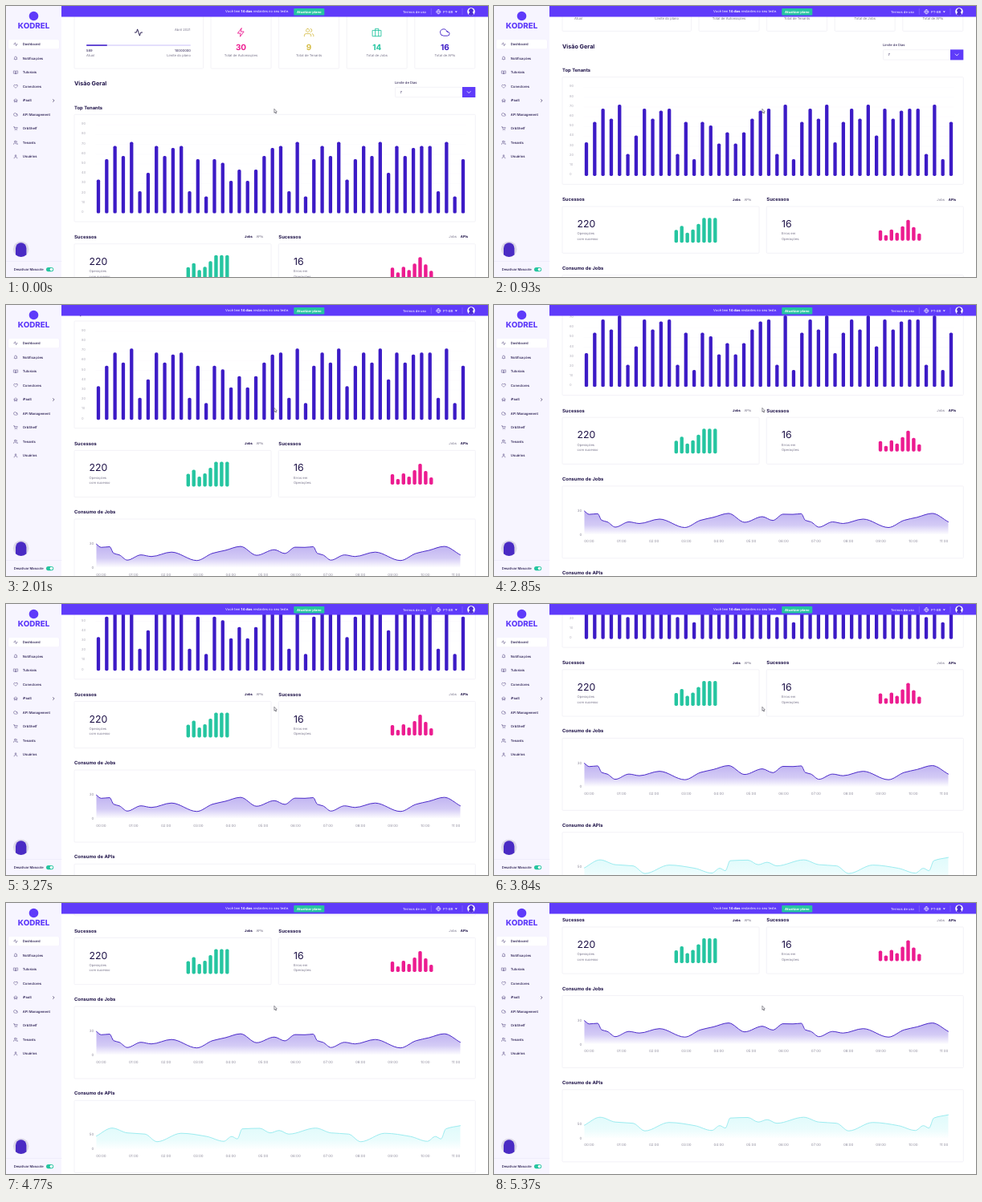
Write an HTML page that moves like this. It is 600 px wide and 338 px high and loops after 5400 ms.

```html
<!DOCTYPE html>
<html lang="pt-BR">
<head>
<meta charset="utf-8">
<title>Dashboard</title>
<style>
  html, body { margin: 0; width: 100%; height: 100%; overflow: hidden; background: #fff; }
  svg { display: block; width: 100vw; height: 100vh; }
  text { font-family: Inter, "Open Sans", sans-serif; text-rendering: geometricPrecision; white-space: pre; }
</style>
</head>
<body>
<svg id="stage" viewBox="0 0 600 338"></svg>
<script>
const LOOP = 5400, STEP = 30;
const NAVY = '#1d1147', GRAY = '#77738a', PALE = '#aeacb8', BLUE = '#3c1bc6',
      VIOLET = '#5f3bfa', TEAL = '#25c5a0', PINK = '#ec1c90';

const ICONS = {
  pulse: 'M22 12h-4l-3 9L9 3l-3 9H2',
  bell: 'M18 8A6 6 0 0 0 6 8c0 7-3 9-3 9h18s-3-2-3-9M13.7 21a2 2 0 0 1-3.4 0',
  book: 'M2 4h6a4 4 0 0 1 4 4v13a3 3 0 0 0-3-3H2zM22 4h-6a4 4 0 0 0-4 4v13a3 3 0 0 1 3-3h7z',
  heart: 'M20.8 4.6a5.5 5.5 0 0 0-7.8 0l-1 1.1-1-1.1a5.5 5.5 0 0 0-7.8 7.8l8.8 8.8 8.8-8.8a5.5 5.5 0 0 0 0-7.8z',
  home: 'M2 11l10-8 10 8M5 10v11h4v-7h6v7h4V10',
  cloud: 'M18 10h-1.3A8 8 0 1 0 9 20h9a5 5 0 0 0 0-10z',
  cart: 'M1 2h4l3 13h11l3-9H6M9 20v1M18 20v1',
  users: 'M17 21v-2a4 4 0 0 0-4-4H5a4 4 0 0 0-4 4v2M9 3a4 4 0 1 0 .1 0M23 21v-2a4 4 0 0 0-3-3.9M16 3.1a4 4 0 0 1 0 7.8',
  user: 'M20 21v-2a4 4 0 0 0-4-4H8a4 4 0 0 0-4 4v2M12 3a4 4 0 1 0 .1 0',
  zap: 'M13 2L4 14h7l-1 8 9-12h-7z',
  bag: 'M2 7h20v14H2zM8 7V3h8v4M8 7v14M16 7v14',
  globe: 'M12 2a10 10 0 1 0 .1 0M2 12h20M12 2c-6 6-6 14 0 20c6-6 6-14 0-20'
};

// Drawing helpers; text is centred vertically on y.
const text = (s, x, y, o = {}) => {
  const { size = 4.15, fill = GRAY, weight = 400, at = 'start' } = o;
  return `<text x="${x}" y="${y + size * 0.35}" font-size="${size}" font-weight="${weight}" fill="${fill}" text-anchor="${at}">${s}</text>`;
};
const rect = (x, y, w, h, fill, r = 0, extra = '') =>
  `<rect x="${x}" y="${y}" width="${w}" height="${h}" rx="${r}" fill="${fill}" ${extra}/>`;
const card = (x, y, w, h) => rect(x, y, w, h, '#fff', 1, 'stroke="#f0eff5" stroke-width=".8"');
const line = (d, stroke, w = 0.8) =>
  `<path d="${d}" fill="none" stroke="${stroke}" stroke-width="${w}" stroke-linecap="round" stroke-linejoin="round"/>`;
const icon = (name, x, y, size, stroke, w = 2) =>
  `<g transform="translate(${x - size / 2} ${y - size / 2}) scale(${size / 24})">${line(ICONS[name], stroke, w)}</g>`;
const heading = (s, y, x = 85, size = 5.86) => text(s, x, y, { size, fill: NAVY, weight: 700 });
const bars = (heights, x, gap, w, base, fill) =>
  heights.map((h, i) => rect(x + i * gap - w / 2, base - h, w, h, fill, w * 0.4)).join('');

// Monotone cubic through the points.
function curve(p) {
  const d = p.slice(1).map((q, i) => (q[1] - p[i][1]) / (q[0] - p[i][0]));
  const slope = i => {
    const a = d[Math.max(i - 1, 0)], b = d[Math.min(i, d.length - 1)];
    return a * b <= 0 ? 0 : 2 * a * b / (a + b);
  };
  return p.slice(1).reduce((path, [x, y], i) => {
    const [u, v] = p[i], h = (x - u) / 3;
    return path + `C${u + h} ${v + slope(i) * h} ${x - h} ${y - slope(i + 1) * h} ${x} ${y}`;
  }, 'M' + p[0]);
}

// A wave that repeats across the plot, with its own first and last value.
function wave(first, last, keys) {
  const left = 112.5, right = 565.5, period = 253.5;
  const again = keys.map(([x, y]) => [x + period, y]).filter(([x]) => x < right);
  return curve([[left, first], ...keys, ...again, [right, last]]);
}

function topCards() {
  let s = card(85, -20, 160.5, 98) + icon('pulse', 165, 33, 11, NAVY)
    + text('Abril 2021', 229.5, 30, { at: 'end' })
    + rect(100, 48.2, 130, 1.5, '#dcd5fb', 0.7) + rect(100, 48.2, 26, 1.5, BLUE, 0.7)
    + text('589', 100, 55.7, { fill: NAVY }) + text('10000000', 230, 55.7, { fill: NAVY, at: 'end' })
    + text('Atual', 100, 62) + text('Limite do plano', 230, 62, { at: 'end' });
  [['zap', 30, 'Automações', PINK], ['users', 9, 'Tenants', '#d6bd47'],
   ['bag', 14, 'Jobs', TEAL], ['cloud', 16, 'APIs', BLUE]].forEach(([ic, n, label, color], i) => {
    const x = 292.5 + i * 84.6;
    s += card(x - 37.5, -20, 75, 98) + icon(ic, x, 33, 12.5, color, 1.7)
      + text(n, x, 51.2, { size: 10, fill: color, weight: 700, at: 'middle' })
      + text('Total de ' + label, x, 62, { at: 'middle' });
  });
  return s;
}

// Tenant loads reuse pieces of one run.
function tenantLoads() {
  const run = [42, 67.5, 84, 71.5, 89, 27.5, 50.5, 84, 71.5, 81.5, 84];
  const dip = [27.5, 67.5, 21, 67.5, 63, 40.5, 54.5, 40.5, 54.5];
  const tail = [27.5, 89, 21, 67.5];
  return [...run, ...dip, ...run.slice(8), ...tail, ...run.slice(2, 5),
    ...run.slice(0, 5), ...run.slice(6), 84, ...tail];
}

function overview() {
  let s = heading('Visão Geral', 96.7, 85, 7.2)
    + text('Limite de Dias', 484, 95.5, { fill: NAVY })
    + card(484.5, 101.3, 99.5, 12.4) + rect(568, 101, 16.3, 13, VIOLET)
    + line('M574.2 106.6l2 2l2-2', '#fff') + text('7', 490.5, 107.5, { fill: NAVY })
    + heading('Top Tenants', 126.5) + card(85, 135.3, 499.3, 133.7);
  for (let i = 0; i < 10; i++) {
    const y = 256.5 - i * 12.2;
    s += line(`M112 ${y + 1.5}H572`, '#faf9fc', 0.5) + text(i * 10, 94, y, { fill: PALE });
  }
  return s + bars(tenantLoads(), 115, 10.318, 4.3, 258.6, BLUE);
}

function summary(x, n, lines, active) {
  const tab = (s, dx) => text(s, x + dx, 288, s === active ? { fill: NAVY, weight: 700 } : {});
  return heading('Sucessos', 288, x) + tab('Jobs', 212) + tab('APIs', 226.5)
    + card(x, 296.7, 245, 58.2)
    + text(n, x + 18.6, 318.5, { size: 12.3, fill: NAVY })
    + lines.map((l, i) => text(l, x + 18.6, 330.6 + i * 6.6)).join('');
}

function areaChart(title, top, ticks, d, color, fill) {
  const label = { size: 4.45, fill: '#8d8a9b' };
  let s = heading(title, top - 9) + card(85, top, 499.3, 90)
    + `<path d="${d}V${top + 60.5}H112.5Z" fill="url(#${fill})"/>` + line(d, color, 1)
    + ticks.map(([v, y]) => text(v, 109.3, y, { ...label, at: 'end' })).join('');
  for (let h = 0; h < 12; h++) {
    const x = Math.min(118.4 + h * 40.35, 560);
    s += text(String(h).padStart(2, '0') + ':00', x, top + 69, { ...label, at: 'middle' });
  }
  return s;
}

const jobs = wave(413.5, 427, [[118.5, 417.6], [129, 416.8], [134, 425], [141, 427], [151, 433.5],
  [168, 427], [181, 429], [206, 423.5], [237.5, 434], [257, 425], [273, 421.3], [292, 416.4],
  [312, 427.5], [334, 420.5], [347, 425.2], [360, 417.4]]);

const apis = wave(544, 531, [[132, 534], [151, 540], [173, 541.5], [188, 551], [218, 540.5],
  [250, 544.5], [271, 550.5], [281, 544.5], [288, 547.5], [294, 535], [316, 534.3], [329, 540],
  [340, 537], [352, 541.5]]);

function page() {
  return topCards() + overview()
    + summary(85, 220, ['Operações', 'com sucesso'], 'Jobs')
    + bars([16, 21, 12.5, 16.5, 23.5, 31, 31, 31], 226.8, 6.93, 4.4, 341.8, TEAL)
    + summary(339.3, 16, ['Erros em', 'Operações.'], 'APIs')
    + bars([13, 7, 14, 10, 18, 26, 17, 9], 481, 6.9, 4.4, 339.3, PINK)
    + areaChart('Consumo de Jobs', 382.3, [[30, 413], [0, 442.8]], jobs, '#4c2bca', 'jobs')
    + areaChart('Consumo de APIs', 499.6, [[50, 542], [0, 560]], apis, '#9cecf0', 'apis');
}

function topBar() {
  const white = { fill: '#fff' };
  return rect(69, 0, 531, 13.5, VIOLET)
    + text('Você tem <tspan font-weight="700">14 dias</tspan> restantes no seu teste.', 273, 7, white)
    + rect(358.3, 3, 38, 8.6, TEAL, 0.8)
    + text('Atualizar plano', 377.3, 7.2, { fill: '#fff', weight: 700, at: 'middle' })
    + text('Termos de uso', 494, 7.2, white)
    + line('M529.3 3.5V10.5M568 3.5V10.5', '#8c72fc', 0.6)
    + icon('globe', 538.3, 7.2, 6.2, '#fff') + text('PT-BR', 544, 7.2, white)
    + '<path d="M558.8 6.4h3l-1.5 1.8z" fill="#fff"/>'
    + '<circle cx="579" cy="7" r="4.8" fill="#fff"/>'
    + '<path d="M575.9 10.6c.2-1.7 1-2.3 1.5-2.6a2.7 2.7 0 1 1 3.2 0c.5.3 1.3.9 1.5 2.6a4.8 4.8 0 0 1-6.2 0z" fill="#4a2bd0"/>';
}

function sidebar() {
  const items = [['pulse', 'Dashboard'], ['bell', 'Notificações'], ['book', 'Tutoriais'], ['heart', 'Conectores'],
    ['home', 'iPaaS'], ['cloud', 'API Management'], ['cart', 'OrbShelf'], ['users', 'Tenants'], ['user', 'Usuários']];
  return rect(0, 0, 69, 338, '#f7f5ff')
    + `<circle cx="34.5" cy="12.5" r="5.8" fill="${VIOLET}"/>`
    + text('KODREL', 34.6, 24.4, { size: 9.8, fill: VIOLET, weight: 800, at: 'middle' })
    + rect(2.5, 42, 64, 12, '#f1eefc', 1.5) + rect(3, 42, 63, 11.4, '#fff', 1.5)
    + items.map(([ic, s], i) => {
      const y = 47.7 + i * 17.53;
      return icon(ic, 12, y, 5.4, '#3a2b6b', 1.9) + text(s, 20.8, y, { size: 4.2, fill: NAVY, weight: 500 });
    }).join('')
    + line('M58.6 116.5l1.5 1.5l-1.5 1.5', NAVY, 0.6)
    + line('M0 318.5H69', '#ebe7f8', 0.6)
    + '<circle cx="18.7" cy="303.2" r="9.8" fill="#dcd8e8"/>'
    + '<path d="M12 310.3V302a6.7 6.7 0 0 1 13.4 0v8.3a9.8 9.8 0 0 1-13.4 0z" fill="#4a2bc4"/>'
    + text('Desativar Mascote', 9.7, 328.5, { fill: NAVY, weight: 500 })
    + rect(50, 326, 9.2, 5.2, TEAL, 2.6) + '<circle cx="56.5" cy="328.6" r="1.8" fill="#fff"/>';
}

const gradient = (id, color, y1, y2, a) =>
  `<linearGradient id="${id}" gradientUnits="userSpaceOnUse" x1="0" x2="0" y1="${y1}" y2="${y2}">
    <stop stop-color="${color}" stop-opacity="${a}"/><stop offset=".6" stop-color="${color}" stop-opacity="${a * 0.65}"/>
    <stop offset="1" stop-color="${color}" stop-opacity="0"/></linearGradient>`;

document.getElementById('stage').innerHTML =
  `<defs>${gradient('jobs', '#7458e0', 413, 443, 0.48)}${gradient('apis', '#8ff0f2', 531, 561, 0.28)}</defs>`
  + rect(0, 0, 600, 338, '#fff') + `<g id="page">${page()}</g>` + topBar() + sidebar()
  + '<path d="M333.9 128.3v5l1.1-1 .8 1.8.8-.4-.8-1.7h1.5z" fill="#fff" stroke="#3c3a46" stroke-width=".55"/>';

// The page scrolls in three strokes.
const soft = s => s + 0.37 * s * (1 - s) * (2 * s - 1);
const settle = s => 1 - (1 - s) ** 1.36;
const strokes = [
  { from: 0, to: 2850, px: 156.5, ease: soft },
  { from: 3030, to: 4620, px: 94.1, ease: settle },
  { from: 4740, to: 4980, px: 16.2, ease: settle }
];
const content = document.getElementById('page');
const start = performance.now();

function draw(ms) {
  const t = Math.floor((ms % LOOP) / STEP) * STEP;
  const y = strokes.reduce((sum, { from, to, px, ease }) =>
    sum + px * ease(Math.min(Math.max((t - from) / (to - from), 0), 1)), 0);
  content.setAttribute('transform', `translate(0 ${-y.toFixed(2)})`);
}

function tick() {
  draw(performance.now() - start);
  requestAnimationFrame(tick);
}
tick();
</script>
</body>
</html>
```
